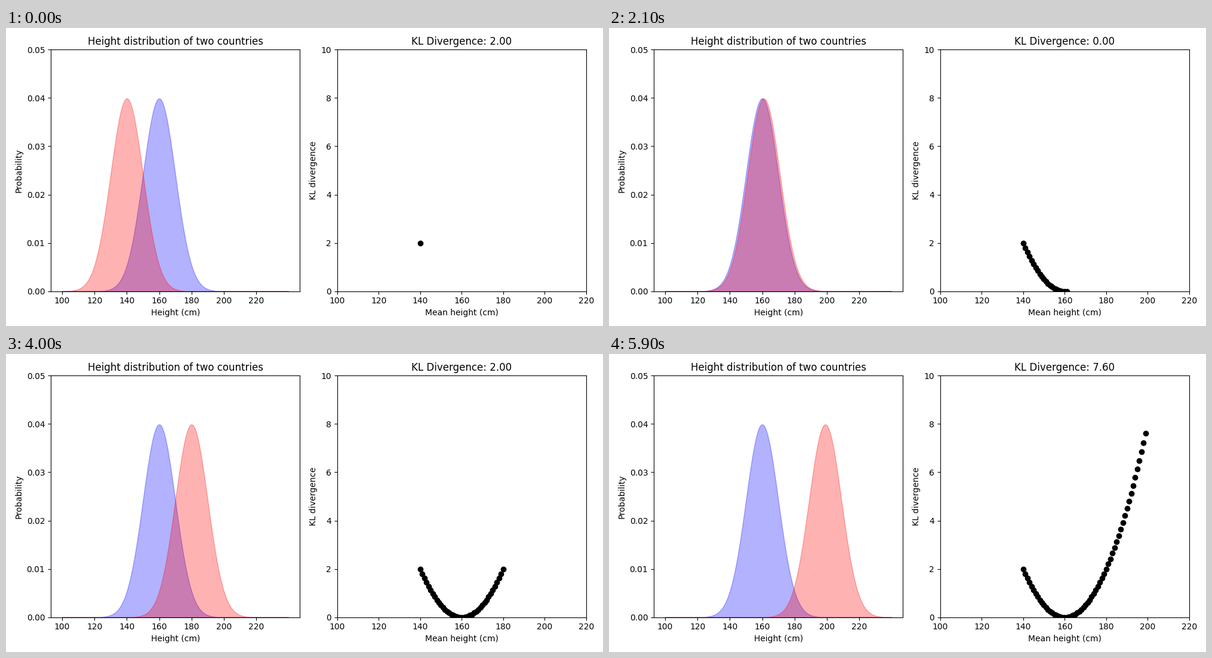
These frames come from a looping animation (1000 by 500 pixels, 6000 ms). A matplotlib script:

```python
import numpy as np
import matplotlib.pyplot as plt
from matplotlib.animation import FuncAnimation

SIGMA = 10
BLUE_MEAN = 160
START_MEAN = 140
FRAMES = 60

heights = np.linspace(100, 240, 1000)


def density(mean):
    z = (heights - mean) / SIGMA
    return np.exp(-z**2 / 2) / (SIGMA * np.sqrt(2 * np.pi))


def kl_divergence(p, q):
    p, q = p / p.sum(), q / q.sum()
    return np.sum(p * np.log(p / q))


def fill(mean, color):
    return left.fill_between(heights, density(mean), color=color, alpha=0.3)


means = START_MEAN + np.arange(FRAMES)
divergences = [kl_divergence(density(m), density(BLUE_MEAN)) for m in means]

fig, (left, right) = plt.subplots(1, 2, figsize=(10, 5), dpi=100)

left.set(title="Height distribution of two countries",
         xlabel="Height (cm)", ylabel="Probability",
         xlim=(93, 247), ylim=(0, 0.05), xticks=range(100, 240, 20))
right.set(title="KL Divergence: 0.00",
          xlabel="Mean height (cm)", ylabel="KL divergence",
          xlim=(100, 220), ylim=(0, 10))

fill(BLUE_MEAN, "blue")
red_fill = fill(START_MEAN, "red")
dots, = right.plot([], [], "ko")
fig.tight_layout()
fig.subplots_adjust(top=0.9276, wspace=0.1496)


def update(frame):
    global red_fill
    red_fill.remove()
    red_fill = fill(means[frame], "red")
    dots.set_data(means[:frame + 1], divergences[:frame + 1])
    right.set_title(f"KL Divergence: {divergences[frame]:.2f}")


anim = FuncAnimation(fig, update, frames=FRAMES, interval=100,
                     repeat=True, repeat_delay=0)
plt.show()
```
